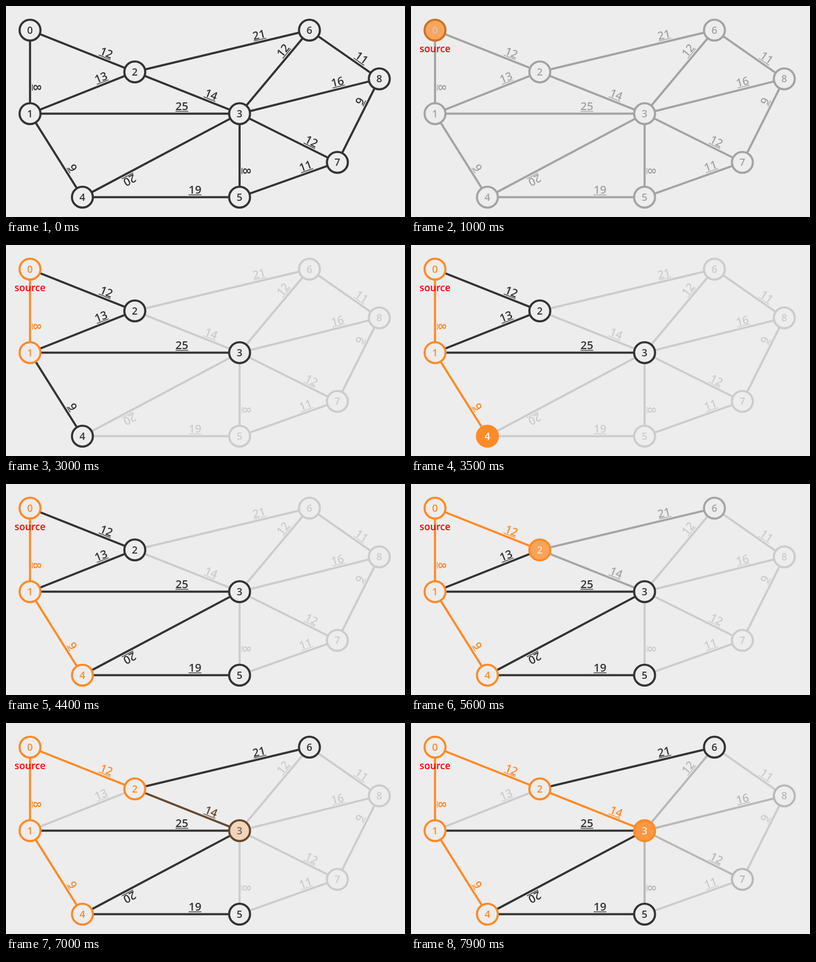
Write an HTML page with a canvas that moves like this. It is 714x379 px and loops after 8 s.

```html
<!DOCTYPE html>
<html lang="en">
<head>
<meta charset="utf-8">
<title>Minimum spanning tree</title>
<style>
  html, body { margin: 0; width: 100%; height: 100%; overflow: hidden; background: #ededed; }
  canvas { display: block; }
</style>
</head>
<body>
<canvas id="stage" width="714" height="379"></canvas>
<script>
const ctx = document.getElementById('stage').getContext('2d');

const LOOP = 8000;
const FADE = 380;
const FONT = '"Open Sans", "Noto Sans", sans-serif';

const PAPER = [237, 237, 237];
const DARK = [51, 51, 51];
const GREY = [204, 204, 204];
const ORANGE = [255, 138, 39];
const WHITE = [255, 255, 255];

// Grid positions, 1.25 px per unit
const nodes = [
  [0, 0], [0, 120], [150, 60], [300, 120], [75, 240],
  [300, 240], [400, 0], [440, 190], [500, 70]
].map(([x, y]) => ({ x: 43 + x * 1.25, y: 43.4 + y * 1.25 }));

// from, to, weight
const edges = [
  [0, 1, 8], [0, 2, 12], [1, 2, 13], [1, 3, 25], [1, 4, 9], [2, 3, 14],
  [2, 6, 21], [3, 4, 20], [3, 5, 8], [3, 6, 12], [3, 7, 12], [3, 8, 16],
  [4, 5, 19], [5, 7, 11], [6, 8, 11], [7, 8, 9]
];

// Node looks: ring, fill, label
const looks = {
  dark: [DARK, PAPER, DARK],
  grey: [GREY, PAPER, GREY],
  done: [ORANGE, PAPER, ORANGE],
  active: [ORANGE, ORANGE, WHITE]
};

const all = (count, look) =>
  Object.fromEntries(Array.from({ length: count }, (_, i) => [i, look]));

// Each step fades the listed nodes and edges to a new look
const steps = [
  { at: 775, nodes: { ...all(9, 'grey'), 0: 'active' },
    edges: Object.fromEntries(edges.map(([a, b]) => [`${a}-${b}`, GREY])) },
  { at: 1235, nodes: { 0: 'done', 1: 'dark', 2: 'dark' }, edges: { '0-1': DARK, '0-2': DARK } },
  { at: 1735, nodes: { 1: 'active' }, edges: { '0-1': ORANGE } },
  { at: 2665, nodes: { 1: 'done', 3: 'dark', 4: 'dark' },
    edges: { '1-2': DARK, '1-3': DARK, '1-4': DARK } },
  { at: 3125, nodes: { 4: 'active' }, edges: { '1-4': ORANGE } },
  { at: 4040, nodes: { 4: 'done', 5: 'dark' }, edges: { '3-4': DARK, '4-5': DARK } },
  { at: 4530, nodes: { 2: 'active' }, edges: { '0-2': ORANGE } },
  { at: 5449, nodes: { 2: 'done', 6: 'dark' }, edges: { '2-3': DARK, '2-6': DARK } },
  { at: 5925, nodes: {}, edges: { '1-2': ORANGE } },
  { at: 6430, nodes: {}, edges: { '1-2': GREY } },
  { at: 6849, nodes: { 3: 'active' }, edges: { '2-3': ORANGE } },
  { at: 7779, nodes: { 3: 'done', 7: 'dark', 8: 'dark' },
    edges: { '3-5': DARK, '3-6': DARK, '3-7': DARK, '3-8': DARK } }
];

const ease = u => u < 0.5 ? 4 * u ** 3 : 1 - 4 * (1 - u) ** 3;
const progress = (t, at) => ease(Math.min(1, Math.max(0, (t - at) / FADE)));
const mix = (a, b, u) => a.map((v, i) => v + (b[i] - v) * u);
const css = c => `rgb(${c.map(Math.round).join(',')})`;

function edgeColor(key, t) {
  return steps.reduce((color, { at, edges }) =>
    edges[key] ? mix(color, edges[key], progress(t, at)) : color, DARK);
}

function nodeColors(id, t) {
  return steps.reduce((colors, { at, nodes }) => nodes[id]
    ? colors.map((c, i) => mix(c, looks[nodes[id]][i], progress(t, at)))
    : colors, looks.dark);
}

function drawEdge([a, b, weight], t) {
  const from = nodes[a], to = nodes[b];
  const dx = to.x - from.x, dy = to.y - from.y;
  const length = Math.hypot(dx, dy);
  const rim = 19;

  ctx.save();
  ctx.translate(from.x, from.y);
  ctx.rotate(Math.atan2(dy, dx));
  ctx.fillStyle = css(edgeColor(`${a}-${b}`, t));
  ctx.fillRect(rim, -1.9, length - 2 * rim, 3.8);

  // The weight sits three quarters along the visible line
  ctx.translate(rim + 0.75 * (length - 2 * rim), 0);
  ctx.font = `600 20px ${FONT}`;
  ctx.fillText(weight, 0, -6);
  const width = ctx.measureText(weight).width;
  ctx.fillRect(-width / 2, -4.9, width, 1.3);
  ctx.restore();
}

function drawNode({ x, y }, id, t) {
  const [ring, fill, label] = nodeColors(id, t).map(css);
  ctx.beginPath();
  ctx.arc(x, y, 18.7, 0, 2 * Math.PI);
  ctx.fillStyle = fill;
  ctx.fill();
  ctx.lineWidth = 3.8;
  ctx.strokeStyle = ring;
  ctx.stroke();
  ctx.fillStyle = label;
  ctx.font = `600 18px ${FONT}`;
  ctx.fillText(id, x, y + 6.4);
}

function draw(t) {
  ctx.fillStyle = css(PAPER);
  ctx.fillRect(0, 0, 714, 379);
  ctx.textAlign = 'center';
  edges.forEach(edge => drawEdge(edge, t));
  nodes.forEach((node, id) => drawNode(node, id, t));
  if (t >= steps[0].at) {
    ctx.fillStyle = '#f00';
    ctx.font = `600 17.2px ${FONT}`;
    ctx.fillText('source', nodes[0].x, 82.5);
  }
}

const start = performance.now();
function tick() {
  draw((performance.now() - start) % LOOP);
  requestAnimationFrame(tick);
}
tick();
</script>
</body>
</html>
```
